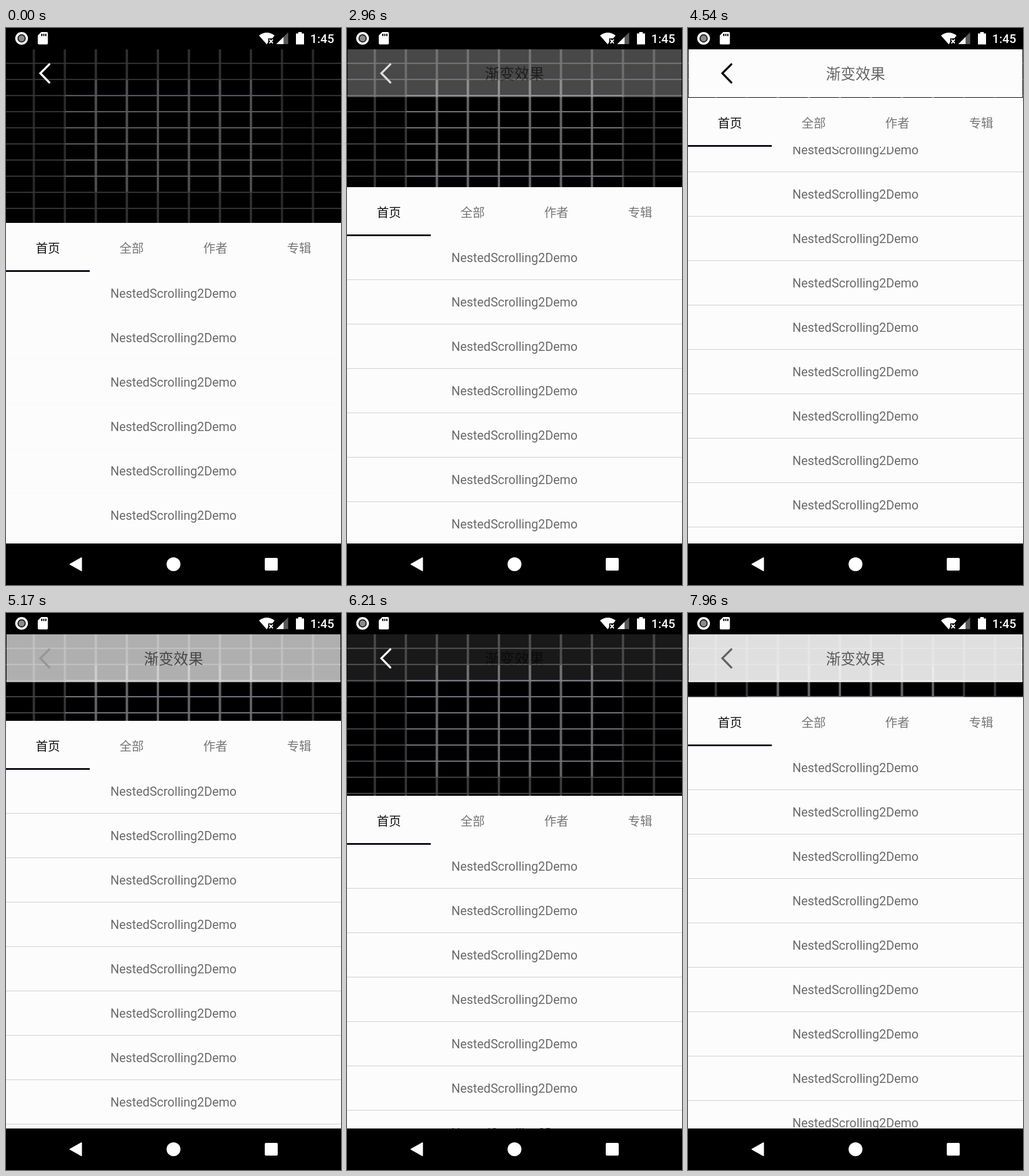
These frames come from a looping animation (580 by 966 pixels, 8000 ms). An HTML page:

```html
<!DOCTYPE html>
<html lang="zh">
<head>
<meta charset="utf-8">
<title>Nested scrolling</title>
<style>
  html, body { margin: 0; width: 100%; height: 100%; overflow: hidden; background: #000; }
  svg { display: block; width: 580px; height: 966px; }
  text { text-anchor: middle; }
  .cjk { font-family: "Noto Sans CJK SC", "Noto Sans CJK", sans-serif; }
  .tab { font-size: 21px; fill: #757575; }
  .row { font: 21.35px Roboto, sans-serif; fill: #6b6b6b; }
</style>
</head>
<body>
<svg viewBox="0 0 580 966">
  <rect width="580" height="966"/>
  <g id="grid"></g>

  <g id="bar">
    <rect x="1" y="37" width="578" height="83" fill="#fcfcfd"/>
    <text class="cjk" x="290" y="88.5" font-size="25.7" fill="#666">渐变效果</text>
  </g>
  <path id="back" d="M75 63 59.5 78.5 75 94.5" fill="none" stroke-width="3.6" stroke-linecap="round"/>

  <g id="sheet">
    <rect width="580" height="900" fill="#fcfcfd"/>
    <g id="list"></g>
    <g id="tabs">
      <rect width="580" height="85" fill="#fcfcfd"/>
      <rect y="82" width="145" height="3" fill="#080810"/>
    </g>
  </g>

  <rect width="580" height="37"/>
  <g fill="#fff">
    <circle cx="27" cy="18" r="11"/>
    <circle cx="27" cy="18" r="7.2" fill="#222"/>
    <circle cx="27" cy="18" r="5.2" fill="#8a8a8a"/>
    <path d="M61 7H70.500Q72.500 7 72.500 9V26.500Q72.500 28.500 70.500 28.500H57Q55 28.500 55 26.500V13Z"/>
    <path d="M62 10v4M65.500 10v4M69 10v4" stroke="#000" stroke-width="2"/>
    <path d="M438 13Q451.500 3 465 13L461 18H454V24L451.500 28.500Z"/>
    <path d="M456 20l6 6.500M462 20l-6 6.500" stroke="#fff" stroke-width="2"/>
    <path d="M488.500 7.500V28H468Z" fill="#5a5a5a"/>
    <path d="M480.500 15.500V28H468Z"/>
    <path d="M506 7h6v2.500h4V28.500H502V9.500h4Z"/>
    <text x="547.500" y="26" font-family="Roboto, sans-serif" font-size="21" font-weight="500">1:45</text>
  </g>

  <rect y="894" width="580" height="72"/>
  <g fill="#fff" stroke="#fff" stroke-linejoin="round">
    <path d="M111 930 130.500 919V941Z" stroke-width="2"/>
    <circle cx="290" cy="930" r="12" stroke="none"/>
    <rect x="448" y="919" width="22.500" height="22" rx="2" stroke="none"/>
  </g>
</svg>
<script>
const LOOP = 8000, RANGE = 217, TOP = 338, ROW = 77;

// [ms, px scrolled in total]; past RANGE the list itself scrolls
const SCROLL = [
  [0, 0], [2959, 0], [2960, 62], [3840, 233], [4080, 268], [4250, 276],
  [4420, 268], [5170, 151], [6210, 21], [6450, 3], [6560, 0], [6780, 0],
  [6950, 5], [7340, 62], [7960, 192], [8000, 200]
];
// [bar opacity, grey level of the back arrow]
const ARROW = [[0, 255], [0.1, 245], [0.286, 221], [0.696, 150], [0.885, 100], [1, 12]];

const $ = id => document.getElementById(id);

function add(parent, tag, attrs, text) {
  const el = document.createElementNS("http://www.w3.org/2000/svg", tag);
  for (const k in attrs) el.setAttribute(k, attrs[k]);
  if (text) el.textContent = text;
  return parent.appendChild(el);
}

function lookup(table, x) {
  for (let i = 1; i < table.length; i++) {
    const [x0, y0] = table[i - 1], [x1, y1] = table[i];
    if (x <= x1) return y0 + (y1 - y0) * (x - x0) / (x1 - x0);
  }
  return table[table.length - 1][1];
}

const grid = $("grid");
const bar = (x, y, width, height, fill) => add(grid, "rect", { x, y, width, height, fill });
for (let i = 0; i < 10; i++) {
  const x = 46.2 + 53.7 * i, inner = i > 1 && i < 8;
  bar(x, 37, 4, 301, inner ? "#3c3c3c" : "#343432");
  if (inner) bar(x, 89, 4, 197, "#626262");
}
for (let j = 0; j < 10; j++) {
  const y = 60.3 + 27.95 * j;
  bar(0, y, 580, 2, "#45444a");
  if (j > 1 && j < 8) bar(102, y, 376, 2, "#77757f");
}

["首页", "全部", "作者", "专辑"].forEach((name, i) => {
  const tab = add($("tabs"), "text", { class: "cjk tab", x: 72.5 + 145 * i, y: 51 }, name);
  if (!i) tab.style.fill = "#111";
});

const lines = [];
for (let i = 0; i < 15; i++) {
  add($("list"), "text", { class: "row", x: 290, y: 130 + ROW * i }, "NestedScrolling2Demo");
  lines.push(add($("list"), "rect", { y: 160 + ROW * i, width: 580, height: 1, fill: "#cdcdcd" }));
}

function draw(t) {
  const total = Math.round(lookup(SCROLL, t));
  const head = Math.min(total, RANGE);
  const a = head / RANGE;
  const grey = Math.round(lookup(ARROW, a));
  const clear = Math.min(1, Math.max(0, (t - 40) / 800));

  $("bar").setAttribute("opacity", a);
  $("back").setAttribute("stroke", `rgb(${grey},${grey},${grey})`);
  $("sheet").setAttribute("transform", `translate(0 ${TOP - head})`);
  $("list").setAttribute("transform", `translate(0 ${head - total})`);
  grid.setAttribute("opacity", 0.8 + 0.2 * clear);
  for (const line of lines) line.setAttribute("opacity", 0.08 + 0.92 * clear);
}

function tick() {
  draw(performance.now() % LOOP);
  requestAnimationFrame(tick);
}
tick();
</script>
</body>
</html>
```
